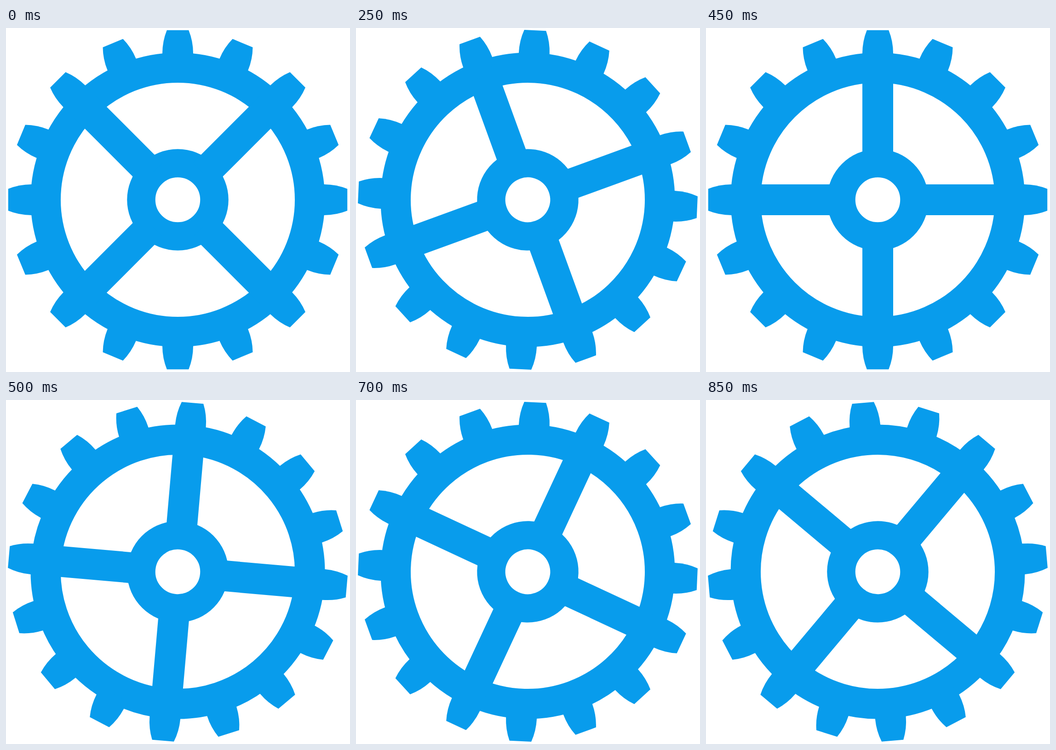
An HTML page for the animation above (0.9 s loop, 748 px wide and 748 px high).

```html
<!DOCTYPE html>
<html lang="en">
<head>
<meta charset="utf-8">
<title>Turning gear</title>
<style>
  html, body { margin: 0; width: 100%; height: 100%; overflow: hidden; background: #fff; }
  svg { display: block; width: 100vw; height: 100vh; }
</style>
</head>
<body>
<svg viewBox="0 0 748 748">
  <g transform="translate(373.5 373.5)">
    <g id="gear" fill="none" stroke="#089cec">
      <circle r="287.25" stroke-width="65.5"/>
      <circle r="79.5" stroke-width="61.5"/>
      <path id="spokes" stroke-width="67"/>
      <path id="tooth" fill="#089cec" stroke="none"
        d="M-33.5-300V-318.5Q-33.3-345-23.7-368.7H23.7Q33.3-345 33.5-318.5V-300Z"/>
    </g>
  </g>
</svg>
<script>
  const LOOP = 900, STEP = 50, TEETH = 16;
  const gear = document.getElementById('gear');
  const tooth = document.getElementById('tooth');

  document.getElementById('spokes').setAttribute('d',
    [45, 135, 225, 315].map(deg => {
      const a = deg * Math.PI / 180, x = Math.cos(a), y = Math.sin(a);
      return `M${80 * x} ${80 * y}L${285 * x} ${285 * y}`;
    }).join(''));

  for (let i = 1; i < TEETH; i++) {
    const copy = tooth.cloneNode();
    copy.removeAttribute('id');
    copy.setAttribute('transform', `rotate(${i * 360 / TEETH})`);
    gear.append(copy);
  }

  // A quarter turn per loop, in 5 degree ticks.
  const start = performance.now();
  function draw() {
    const t = (performance.now() - start) % LOOP;
    gear.setAttribute('transform', `rotate(${Math.floor(t / STEP) * 90 * STEP / LOOP})`);
    requestAnimationFrame(draw);
  }
  draw();
</script>
</body>
</html>
```
